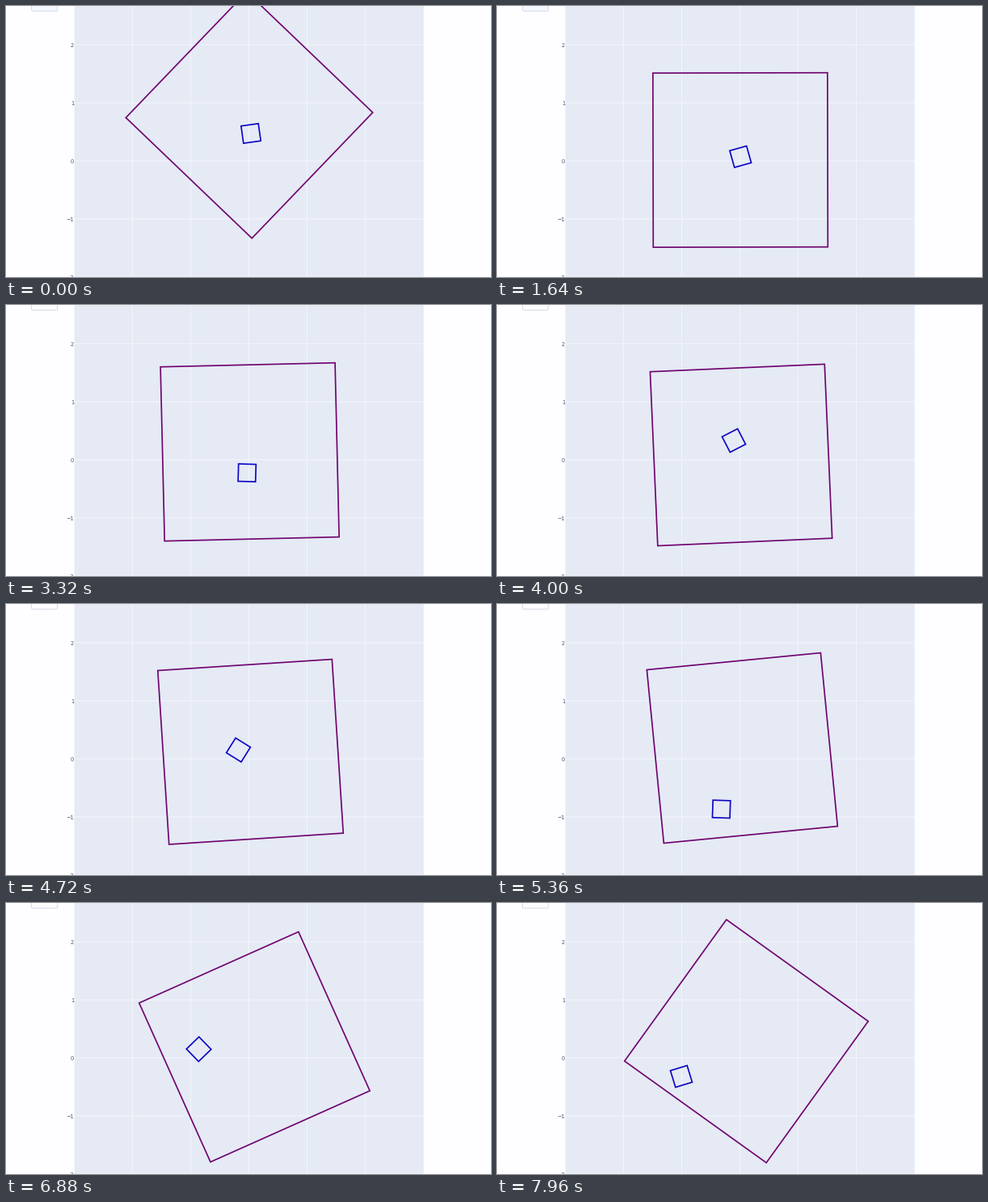
Animation, 600 px wide and 336 px high, one loop 8000 ms. Source, as a matplotlib script:

```python
import numpy as np
import matplotlib.pyplot as plt
from matplotlib.animation import FuncAnimation
from matplotlib.patches import FancyBboxPatch, Polygon, Rectangle

W, H, DPI = 600, 336, 100
FRAMES, STEP = 200, 40
UNIT, X0, Y0 = 72, 300.4, 192    # pixels per axis unit, origin on stage
PX = 72 / DPI                    # points per pixel

HALT, RESTART = 0.84, 1.28       # end of the first run, start of the second
FALL, LIFT = 55, 6.6             # half accelerations of block and box, px/s2
# Key poses, mostly impacts: time, box x, y, angle, block x, y, angle
KEYS = np.array([
    [RESTART, 301, 192, 0, 301, 192, 0],
    [2.82, 301.3, 175.5, 0.5, 302, 270, 67],
    [4.72, 302.5, 183.3, 3.7, 287.5, 181, 148],
    [5.28, 302.9, 177.5, 4.6, 281.7, 271, 174],
    [6.35, 309, 184.5, 17.6, 227, 106, 228],
    [7.18, 306.5, 173.3, 27.8, 245, 237.5, 222],
    [7.96, 308.5, 171.3, 54.3, 228, 215, 197],
])
ACCEL = np.array([0, -LIFT, 0, 0, FALL, 0])


def pose(t):
    """Box x, y, angle and block x, y, angle at time t."""
    if t < RESTART - 1e-6:
        s = min(t, HALT)
        return np.array([301, 135.25 - 2 * s, 46.2 + 2.4 * s,
                         303 + s, 158 + FALL * s * s, 8 + 20 * s])
    times = KEYS[:, 0]
    t = min(t, times[-1])
    i = np.clip(np.searchsorted(times, t, "right") - 1, 0, len(KEYS) - 2)
    s, left = t - times[i], times[i + 1] - t
    a, b = KEYS[i, 1:], KEYS[i + 1, 1:]
    return a + (b - a) * s / (s + left) - ACCEL * s * left


def square(x, y, angle, side):
    a = np.radians(angle + 45 + 90 * np.arange(4))
    r = side * UNIT / np.sqrt(2)
    return np.column_stack([x + r * np.cos(a), y - r * np.sin(a)])


fig = plt.figure(figsize=(W / DPI, H / DPI), dpi=DPI, facecolor="#fefdff")
ax = fig.add_axes([0, 0, 1, 1])
ax.set_xlim(0, W)
ax.set_ylim(H, 0)
ax.axis("off")

ax.add_patch(Rectangle((84.6, -5), 432, H + 10, fc="#e5eaf5", ec="none",
                       snap=False))
grid = dict(color="#f4f6fc", lw=PX, snap=False)
for i in range(-2, 3):
    x, y = X0 + i * UNIT, Y0 - i * UNIT
    ax.plot([x, x], [-5, H + 5], **grid)
    ax.plot([85, 516], [y, y], **grid)
    ax.text(84.2, y + 0.5, str(i).replace("-", "\u2212"), ha="right",
            va="center_baseline", fontsize=6.6 * PX, family="DejaVu Sans",
            color="#4a5872")

button = FancyBboxPatch((31.5, -20), 32, 26.3, fc="#f4f8fe", ec="#d3dce9",
                        lw=PX, boxstyle="round,pad=0,rounding_size=1.5")
ax.add_patch(button)


def outline(side, color):
    shape = Polygon(square(X0, Y0, 0, side), fill=False, ec=color,
                    lw=1.7 * PX, zorder=3, snap=False)
    return ax.add_patch(shape)


box = outline(3, "#70046f")
block = outline(0.3, "#0d06c4")


def draw(i):
    t = i * STEP / 1000
    p = pose(t)
    box.set_xy(square(*p[:3], 3))
    block.set_xy(square(*p[3:], 0.3))
    button.set_facecolor("#f4f8fe" if t < 1.9 else "#fefdff")
    return box, block, button


anim = FuncAnimation(fig, draw, frames=FRAMES, interval=STEP,
                     repeat=True, repeat_delay=0)
plt.show()
```
